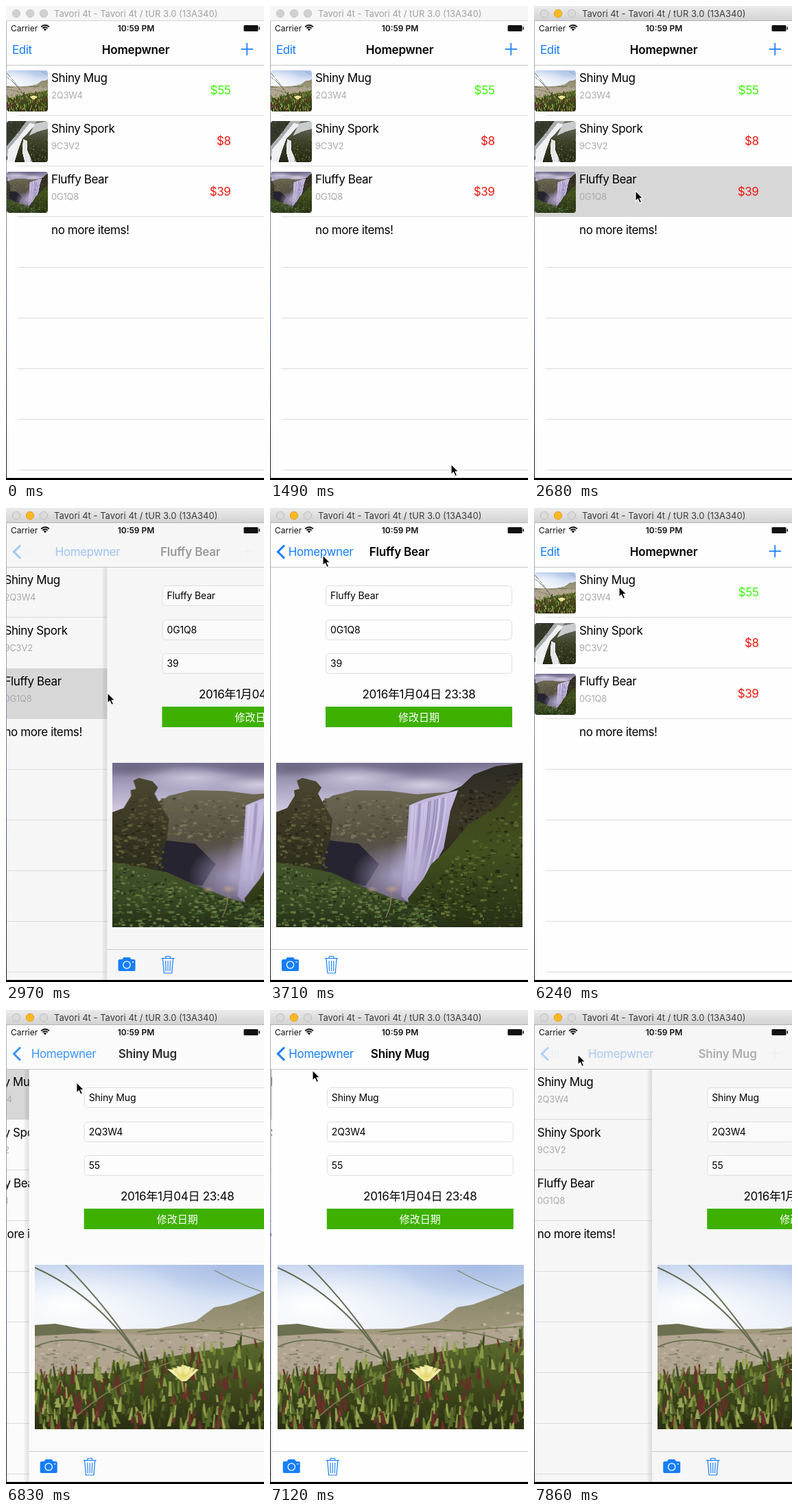
An HTML page with a canvas for the animation above (8000 ms loop, 376 by 692 pixels).

```html
<!DOCTYPE html>
<html lang="en">
<head>
<meta charset="utf-8">
<title>Homepwner</title>
<style>
html, body { margin: 0; width: 100%; height: 100%; overflow: hidden; background: #fff; }
canvas { display: block; width: 376px; height: 692px; }
</style>
</head>
<body>
<canvas id="stage" width="376" height="692"></canvas>
<script>
const ctx = document.getElementById('stage').getContext('2d');
const LOOP = 8000, W = 375, BLUE = '#157efb';
const FAMILY = 'Inter, "Noto Sans CJK SC", "Noto Sans CJK", sans-serif';

const items = [
  { name: 'Shiny Mug', serial: '2Q3W4', value: 55, date: '2016年1月04日 23:48', photo: makePhoto(paintDunes) },
  { name: 'Shiny Spork', serial: '9C3V2', value: 8, date: '', photo: makePhoto(paintCascade) },
  { name: 'Fluffy Bear', serial: '0G1Q8', value: 39, date: '2016年1月04日 23:38', photo: makePhoto(paintFalls) }
];

// The screen refreshes only in these bursts: [first, last, count]
const bursts = [[0, 0, 1], [1350, 2080, 6], [2380, 2380, 1], [2680, 3710, 8], [4900, 5490, 5],
  [6240, 7270, 8], [7420, 7420, 1], [7720, 7860, 2]];
const ticks = bursts.flatMap(([a, b, n]) =>
  Array.from({ length: n }, (_, i) => n === 1 ? a : Math.round((a + (b - a) * i / (n - 1)) / 10) * 10));

// [time, x, y] of the pointer tip
const pointerPath = [[1350, 264, 669], [1500, 238, 560], [1650, 192, 425], [1790, 150, 320], [1930, 129, 266],
  [2080, 151, 270], [2380, 148, 270], [3270, 148, 270], [3710, 77, 69], [6090, 77, 69], [6240, 124, 115],
  [6680, 124, 115], [7120, 62, 88], [7270, 60, 80], [7420, 64, 65], [8000, 64, 65]];

function seeded(s) {
  return () => (s = (s * 16807) % 2147483647) / 2147483647;
}

function vertical(g, y0, y1, ...colors) {
  const grad = g.createLinearGradient(0, y0, 0, y1);
  colors.forEach((c, i) => grad.addColorStop(i / (colors.length - 1), c));
  return grad;
}

function poly(g, fill, ...p) {
  g.beginPath();
  for (let i = 0; i < p.length; i += 2) g.lineTo(p[i], p[i + 1]);
  g.closePath();
  g.fillStyle = fill;
  g.fill();
}

function blob(g, color, x, y, rx, ry) {
  g.save();
  g.translate(x, y);
  g.scale(rx, ry);
  const grad = g.createRadialGradient(0, 0, 0, 0, 0, 1);
  grad.addColorStop(0, color);
  grad.addColorStop(1, color.slice(0, 7) + '00');
  g.fillStyle = grad;
  g.fillRect(-1, -1, 2, 2);
  g.restore();
}

function curve(g, color, width, x0, y0, cx, cy, x1, y1) {
  g.beginPath();
  g.moveTo(x0, y0);
  g.quadraticCurveTo(cx, cy, x1, y1);
  g.strokeStyle = color;
  g.lineWidth = width;
  g.stroke();
}

function makePhoto(paint) {
  const c = document.createElement('canvas');
  c.width = 359;
  c.height = 240;
  paint(c.getContext('2d'));
  return c;
}

function speckle(g, seed, n, colors, x0, x1, top, bottom) {
  const rnd = seeded(seed);
  for (let i = 0; i < n; i++) {
    const x = x0 + rnd() * (x1 - x0), t = top(x), y = t + rnd() * (bottom - t);
    g.fillStyle = colors[Math.floor(rnd() * colors.length)];
    g.fillRect(x, y, 2 + rnd() * 5, 1 + rnd() * 3);
  }
}

function paintDunes(g) {
  g.fillStyle = vertical(g, 0, 110, '#b9cbec', '#d9e4f5', '#f3f6fa');
  g.fillRect(0, 0, 359, 240);
  blob(g, '#ffffffff', 50, 60, 190, 75);
  blob(g, '#9db4e0aa', 300, 0, 130, 55);
  poly(g, vertical(g, 20, 150, '#7d8062', '#9c9479', '#b3a68e'),
    359, 28, 320, 45, 285, 58, 262, 62, 235, 82, 180, 93, 120, 94, 0, 92, 0, 240, 359, 240);
  poly(g, '#6c7050', 0, 88, 30, 86, 62, 92, 100, 98, 40, 108, 0, 105);
  poly(g, '#b1a591', 0, 104, 70, 100, 160, 102, 300, 96, 359, 82, 359, 150, 0, 175);
  speckle(g, 5, 220, ['#8d8570', '#c0b5a0', '#77775b', '#a19780'], 0, 359, x => x > 210 ? 80 - (x - 210) * .2 : 104, 155);
  poly(g, vertical(g, 110, 240, '#5e6c30', '#414c1d', '#2b2e13'),
    0, 168, 50, 160, 110, 158, 160, 142, 230, 128, 300, 118, 359, 108, 359, 240, 0, 240);
  const rnd = seeded(41), greens = ['#6f8434', '#8a9a48', '#55682a', '#39441b', '#682f29', '#98a553', '#4c5c22'];
  for (let i = 0; i < 480; i++) {
    const x = rnd() * 365 - 3, top = 168 - x * .16, y = top + i / 480 * (245 - top);
    const h = 8 + rnd() * 14, lean = rnd() * 8 - 4, w = 1.5 + rnd() * 2.5;
    poly(g, greens[Math.floor(rnd() * greens.length)], x - w, y, x + lean - 1, y - h, x + lean + 1, y - h, x + w, y);
  }
  curve(g, '#5d6549', 2, 0, 4, 98, 48, 162, 150);
  curve(g, '#5d6549', 1.8, 45, 0, 105, 60, 157, 140);
  curve(g, '#67704b', 1.8, 0, 120, 60, 92, 158, 140);
  curve(g, '#75804f', 1.6, 60, 222, 115, 170, 210, 138);
  curve(g, '#687149', 1.5, 150, 98, 270, 82, 359, 122);
  curve(g, '#7a8058', 1.3, 162, 102, 270, 95, 359, 90);
  curve(g, '#7a8460', 1.2, 262, 8, 310, 35, 359, 48);
  for (let a = -3; a <= 3; a++) poly(g, a % 2 ? '#f4efb0' : '#ebe48b', 214, 170, 214 + a * 7, 146 + Math.abs(a) * 2, 221 + a * 6, 147 + Math.abs(a) * 2, 222, 169);
  blob(g, '#e2d45cff', 217, 162, 11, 7);
}

function paintCascade(g) {
  g.fillStyle = vertical(g, 0, 240, '#70766a', '#3d4129', '#252715');
  g.fillRect(0, 0, 359, 240);
  poly(g, '#33382a', 60, 0, 175, 0, 150, 45, 105, 95, 60, 130);
  poly(g, '#aaaeb0', 175, 0, 235, 0, 205, 45, 170, 75, 128, 120, 110, 190, 60, 205, 60, 145, 115, 80);
  poly(g, '#eff0f1', 195, 10, 228, 20, 182, 70, 150, 105, 128, 165, 105, 240, 60, 240, 68, 165, 120, 105);
  poly(g, '#e5e7e8', 155, 105, 178, 115, 180, 170, 210, 240, 165, 240, 150, 180);
  poly(g, '#c9cccd', 225, 15, 299, 0, 299, 45, 240, 62, 190, 85);
  speckle(g, 17, 250, ['#4f5a28', '#788039', '#25290f', '#3c4421'], 192, 300, x => 95, 240);
  speckle(g, 23, 80, ['#555b42', '#23271c', '#41472f'], 60, 140, () => 0, 70);
}

function paintFalls(g) {
  g.fillStyle = vertical(g, 0, 70, '#77718f', '#aaa3c1', '#d1c9df');
  g.fillRect(0, 0, 359, 240);
  blob(g, '#d9d2e8cc', 115, 22, 85, 18);
  blob(g, '#686181bb', 200, 6, 80, 14);
  blob(g, '#605b76aa', 25, 8, 65, 14);
  blob(g, '#e1daebcc', 215, 32, 60, 12);
  poly(g, vertical(g, 35, 180, '#6f6b55', '#565143', '#5e566a'),
    55, 65, 82, 48, 115, 40, 165, 41, 205, 46, 260, 42, 260, 220, 55, 220);
  speckle(g, 31, 160, ['#77735b', '#4c4a38', '#656247'], 68, 195, () => 50, 115);
  poly(g, vertical(g, 0, 160, '#2c2923', '#3c3828', '#292817'),
    245, 46, 270, 34, 288, 17, 320, 5, 359, 0, 359, 150, 235, 175);
  speckle(g, 37, 170, ['#242119', '#464430', '#35301f'], 266, 359, x => 45 - (x - 266) * .4, 100);
  poly(g, '#272431', 65, 112, 120, 118, 150, 148, 130, 180, 60, 165);
  poly(g, vertical(g, 45, 200, '#c5bbe0', '#b2a6d1', '#9187ae'),
    194, 62, 216, 53, 265, 40, 254, 70, 244, 125, 221, 165, 198, 208, 182, 195, 190, 125);
  const rnd = seeded(9);
  for (let i = 0; i < 24; i++) {
    const x = 198 + rnd() * 54;
    curve(g, rnd() < .55 ? '#ded6ef88' : '#8f84b088', 2, x, 62 - (x - 198) * .25, x - 3, 110, x - 6 - (x - 198) * .45, 172);
  }
  blob(g, '#a79dc2ee', 175, 165, 65, 48);
  blob(g, '#c3b9dccc', 198, 150, 34, 55);
  poly(g, vertical(g, 20, 220, '#4c4731', '#343220', '#26291a'),
    0, 72, 16, 66, 27, 48, 26, 40, 34, 38, 30, 26, 38, 22, 58, 27, 66, 36, 61, 45, 70, 62, 82, 82, 78, 115, 65, 152, 95, 180, 0, 200);
  speckle(g, 47, 200, ['#514e31', '#2b2a1b', '#3d3d25', '#606038'], 0, 74, x => x < 25 ? 72 : 40 + Math.abs(x - 45), 155);
  poly(g, vertical(g, 20, 240, '#3c421d', '#42501f', '#262f15'),
    359, 22, 322, 65, 280, 90, 252, 124, 226, 148, 214, 170, 192, 198, 195, 215, 240, 240, 359, 240);
  speckle(g, 53, 460, ['#526126', '#303917', '#3d4a20', '#626e32', '#232914'], 198, 359, x => Math.max(48, 205 - (x - 195) * 1.03), 240);
  poly(g, vertical(g, 145, 240, '#43532b', '#3b4d25', '#253019'),
    0, 145, 40, 152, 80, 160, 115, 176, 170, 198, 225, 212, 265, 240, 0, 240);
  speckle(g, 59, 520, ['#577037', '#2c3b1e', '#465e2d', '#6a7b43', '#243018'], 0, 230, x => 145 + x * .31, 240);
  curve(g, '#9b8068', 1.2, 160, 225, 170, 205, 168, 182);
  blob(g, '#bd9f8ddd', 169, 184, 11, 6);
  blob(g, '#b29580dd', 139, 185, 9, 5);
}

function text(str, x, y, size, color, { weight = 400, align = 'left', track = 0 } = {}) {
  ctx.font = `${weight} ${size}px ${FAMILY}`;
  ctx.letterSpacing = track + 'px';
  ctx.textAlign = align;
  ctx.fillStyle = color;
  ctx.fillText(str, x, y);
}

function rect(color, x, y, w, h) {
  ctx.fillStyle = color;
  ctx.fillRect(x, y, w, h);
}

function box(x, y, w, h, r) {
  ctx.beginPath();
  ctx.roundRect(x, y, w, h, r);
}

function strokeLine(color, width, ...p) {
  ctx.beginPath();
  for (let i = 0; i < p.length; i += 2) ctx.lineTo(p[i], p[i + 1]);
  ctx.strokeStyle = color;
  ctx.lineWidth = width;
  ctx.stroke();
}

function faded(alpha, draw) {
  ctx.save();
  ctx.globalAlpha = alpha;
  draw();
  ctx.restore();
}

function shifted(dx, draw) {
  ctx.save();
  ctx.translate(dx, 0);
  draw();
  ctx.restore();
}

function drawTitleBar(active) {
  rect(active ? vertical(ctx, 0, 21, '#ebebeb', '#d3d3d3') : '#f6f6f6', 0, 0, 376, 21);
  rect(active ? '#b4b4b4' : '#d4d4d4', 0, 21, 376, 1);
  [15, 35, 55].forEach((x, i) => {
    const lit = active && i === 1;
    ctx.beginPath();
    ctx.arc(x, 11, 5.7, 0, 7);
    ctx.fillStyle = lit ? '#fdb924' : active ? '#dadada' : '#d0d0d0';
    ctx.fill();
    ctx.lineWidth = 1;
    ctx.strokeStyle = lit ? '#e0a020' : active ? '#bdbdbd' : '#c8c8c8';
    ctx.stroke();
  });
  text('Tavori 4t - Tavori 4t / tUR 3.0 (13A340)', 70, 16, 13, active ? '#3c3c3c' : '#a2a2a2');
}

function drawStatusBar() {
  text('Carrier', 7, 36.5, 12, '#111');
  text('10:59 PM', 189.5, 36.5, 12, '#111', { weight: 600, align: 'center' });
  ctx.strokeStyle = '#111';
  ctx.lineWidth = 1.8;
  [8, 5].forEach(r => {
    ctx.beginPath();
    ctx.arc(57, 36, r, -Math.PI * .76, -Math.PI * .24);
    ctx.stroke();
  });
  ctx.beginPath();
  ctx.moveTo(57, 36.5);
  ctx.arc(57, 36, 3, -Math.PI * .76, -Math.PI * .24);
  ctx.fillStyle = '#111';
  ctx.fill();
  box(346.5, 28, 21, 9, 1.5);
  ctx.fill();
  rect('#111', 368.5, 30.5, 1.5, 4);
}

function drawList(bg, selected) {
  rect(bg, 1, 87, W, 602);
  if (selected >= 0) rect('#d7d7d7', 1, 86 + selected * 74, W, 74);
  for (let i = 0; i < 8; i++) if (i !== selected && i !== selected - 1) rect('#dbdbde', 17, 159 + i * 74, 359, 1);
  items.forEach((item, i) => {
    const y = 86 + i * 74;
    ctx.save();
    box(1, y + 8, 60, 60, 4);
    ctx.clip();
    ctx.drawImage(item.photo, 59.5, 0, 240, 240, 1, y + 8, 60, 60);
    ctx.restore();
    text(item.name, 66, y + 24.5, 17, '#000', { track: -.4 });
    text(item.serial, 66, y + 49, 13, '#aaa', { track: -.2 });
    text('$' + item.value, 327.5, y + 43, 17, item.value > 50 ? '#3cf50a' : '#f01810', { align: 'right', track: -.4 });
  });
  text('no more items!', 66, 332.5, 17, '#000', { track: -.4 });
}

function drawToolbar() {
  rect('#c9c9cb', 1, 644, W, 1);
  ctx.fillStyle = BLUE;
  box(17, 659, 25, 17, 2);
  ctx.fill();
  poly(ctx, BLUE, 22, 660, 25, 656, 34, 656, 37, 660);
  ctx.beginPath();
  ctx.arc(29.5, 667, 5.2, 0, 7);
  ctx.strokeStyle = '#fff';
  ctx.lineWidth = 1.3;
  ctx.stroke();
  rect('#fff', 37.5, 662, 2, 1.5);
  strokeLine(BLUE, 1.2, 80, 657.5, 99, 657.5);
  strokeLine(BLUE, 1.2, 86, 657, 86.5, 654.5, 92.5, 654.5, 93, 657);
  strokeLine(BLUE, 1.2, 82, 658, 83.8, 679, 95.2, 679, 97, 658);
  [-3, 0, 3].forEach(d => strokeLine(BLUE, 1.1, 89.5 + d * 1.15, 661, 89.5 + d, 676));
}

function drawDetail(item, bg) {
  rect(bg, 1, 87, W, 602);
  [item.name, item.serial, String(item.value)].forEach((value, i) => {
    const y = [113, 163, 212][i];
    box(81.5, y + .5, 271, 29, 5);
    ctx.fillStyle = '#ffffff88';
    ctx.fill();
    ctx.strokeStyle = '#dedede';
    ctx.lineWidth = 1;
    ctx.stroke();
    text(value, 88, y + 20, 14, '#000', { track: -.15 });
  });
  text(item.date, 217, 278, 17, '#000', { align: 'center', track: -.3 });
  rect('#3eb000', 81, 290, 272, 30);
  text('修改日期', 217, 310.5, 15, '#fff', { align: 'center' });
  ctx.drawImage(item.photo, 9, 372);
  drawToolbar();
}

function drawNavBar(p, item, bg, pressed) {
  const u = 1 - p, listAlpha = u ** 4, detailAlpha = p ** 2 * (pressed ? .3 : 1);
  rect(bg, 1, 22, W, 64);
  const middle = 74 + 115 * u;
  faded(listAlpha, () => {
    text('Edit', 9, 70, 17, BLUE, { track: -.4 });
    strokeLine(BLUE, 1.7, 342.5, 63, 360, 63);
    strokeLine(BLUE, 1.7, 351.2, 54, 351.2, 72);
    text('Homepwner', middle, 70, 17, '#000', { weight: 600, align: 'center', track: -.2 });
  });
  faded(detailAlpha, () => {
    strokeLine(BLUE, 3, 21, 54.5, 11.5, 64, 21, 73.5);
    text('Homepwner', middle, 70, 17, BLUE, { align: 'center', track: -.4 });
  });
  faded(p ** 2, () => text(item.name, 188.5 + 205 * u, 70, 17, '#000', { weight: 600, align: 'center', track: -.2 }));
  rect('#c4c4c7', 1, 86, W, 1);
}

function drawPointer(t) {
  if (t < pointerPath[0][0]) return;
  const i = pointerPath.findIndex(k => k[0] > t);
  const [t0, x0, y0] = pointerPath[i - 1], [t1, x1, y1] = pointerPath[i];
  const f = (t - t0) / (t1 - t0);
  ctx.save();
  ctx.translate(x0 + (x1 - x0) * f, y0 + (y1 - y0) * f);
  poly(ctx, '#000', 0, 0, 0, 15, 3.4, 11.8, 6, 17.5, 8.6, 16.3, 6.1, 10.8, 10.8, 10.8);
  ctx.strokeStyle = '#fff';
  ctx.lineWidth = 1.1;
  ctx.stroke();
  ctx.restore();
}

function remaining(t, start) {
  const r = t < start ? 1 : Math.exp((start - t) / 100);
  return r < .0045 ? 0 : r;
}

// 0 shows the list, 1 shows the detail page
function detailProgress(t) {
  if (t < 4940) return 1 - remaining(t, 2876);
  if (t < 6586) return remaining(t, 4940);
  if (t < 7799) return 1 - remaining(t, 6586);
  return remaining(t, 7799);
}

function selectedRow(t) {
  if (t >= 2680 && t < 4900) return 2;
  return t >= 6390 && t < 7720 ? 0 : -1;
}

function render(time) {
  const t = ticks.filter(k => k <= time).pop();
  const p = detailProgress(t), x = W * (1 - p);
  const item = items[t < 6240 ? 2 : 0];
  const pressed = (t >= 4900 && t < 4940) || (t >= 7720 && t < 7799);
  const shade = Math.round(254 - 34 * p * (1 - p));
  const bg = `rgb(${shade},${shade},${shade})`;

  rect('#000', 0, 0, 376, 692);
  rect(vertical(ctx, 22, 689, '#a9b0c4', '#8f9ab5', '#46618c', '#10151f'), 0, 22, 1, 667);
  ctx.save();
  ctx.beginPath();
  ctx.rect(1, 22, W, 667);
  ctx.clip();
  if (p < 1) shifted(-.3 * W * p, () => drawList(bg, selectedRow(t)));
  if (p > 0) shifted(x, () => {
    const shadow = ctx.createLinearGradient(-6, 0, 1, 0);
    shadow.addColorStop(0, 'rgba(0,0,0,.03)');
    shadow.addColorStop(1, 'rgba(0,0,0,.11)');
    if (p < 1) rect(shadow, -6, 87, 7, 602);
    drawDetail(item, bg);
  });
  drawNavBar(p, item, bg, pressed);
  drawStatusBar();
  ctx.restore();
  drawTitleBar(t >= 2680);
  drawPointer(t);
}

function loop() {
  render(performance.now() % LOOP);
  requestAnimationFrame(loop);
}
loop();
</script>
</body>
</html>
```
